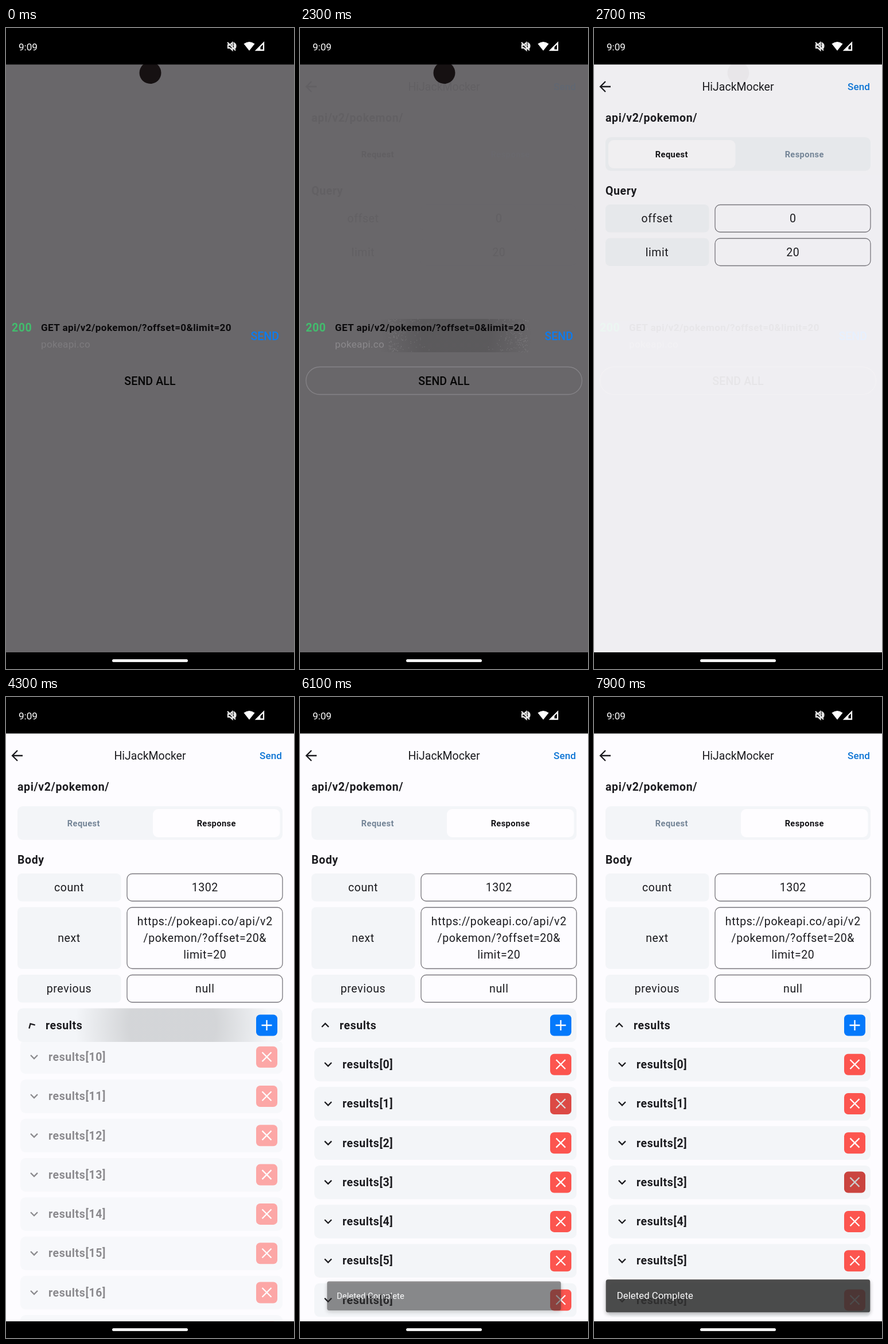
An HTML page that plays this animation: 502x1115 px, repeating every 8000 ms.

```html
<!DOCTYPE html>
<html lang="en">
<head>
<meta charset="utf-8">
<title>Request mocker</title>
<style>
  html, body { margin: 0; width: 100%; height: 100%; overflow: hidden; background: #000; }
  svg { display: block; width: 502px; height: 1115px; font-family: Roboto, sans-serif; }
  text { white-space: pre; }
  .line { fill: none; stroke-width: 2.3; }
  #toastBox { filter: drop-shadow(0 3px 4px rgba(0, 0, 0, .35)); }
</style>
</head>
<body>
<svg id="stage" viewBox="0 0 502 1115">
  <defs>
    <radialGradient id="glow">
      <stop offset=".45" stop-opacity=".13"/>
      <stop offset="1" stop-opacity="0"/>
    </radialGradient>
    <clipPath id="app"><rect y="63" width="502" height="1023"/></clipPath>
    <clipPath id="callRow"><rect y="506" width="502" height="58"/></clipPath>
    <clipPath id="resultRow"><rect x="20" y="541.5" width="462" height="58.5" rx="9"/></clipPath>
    <clipPath id="listArea"><rect y="600" width="502" height="486"/></clipPath>
  </defs>
  <g clip-path="url(#app)">
    <g id="home"></g>
    <g id="paper"></g>
    <g id="ink"></g>
    <g id="response"></g>
    <g id="toast"></g>
  </g>
  <g id="system"></g>
</svg>
<script>
const LOOP = 8000, STEP = 100;
const INK = '#1b1b1f', MUTED = '#738496', BOX = '#f3f5f8', PAPER = '#fdfcff';
const $ = id => document.getElementById(id);

// ---- drawing helpers ----
function add(parent, tag, attrs, content) {
  const el = document.createElementNS('http://www.w3.org/2000/svg', tag);
  for (const k in attrs) el.setAttribute(k, attrs[k]);
  if (content !== undefined) el.textContent = content;
  parent.append(el);
  return el;
}
const group = (parent, attrs = {}) => add(parent, 'g', attrs);
const box = (parent, x, y, w, h, r, fill, more = {}) =>
  add(parent, 'rect', { x, y, width: w, height: h, rx: r, fill, ...more });
const line = (parent, d, color, more = {}) =>
  add(parent, 'path', { d, stroke: color, class: 'line', ...more });

// y is the middle of the capital letters
function label(parent, str, x, y, { size = 19.5, weight = 400, ls = .6, fill = INK, anchor = 'start' } = {}) {
  return add(parent, 'text', {
    x, y: y + size * .356, fill, 'font-size': size, 'font-weight': weight,
    'letter-spacing': ls, 'text-anchor': anchor
  }, str);
}
const keyBox = (parent, y, h) => box(parent, 20, y, 180.5, h, 8, BOX);
const valueBox = (parent, y, h) =>
  box(parent, 211, y + .5, 271, h - 1, 9, 'none', { stroke: '#77757b', 'stroke-width': 1.3 });
function field(fills, lines, y, h, key, values) {
  keyBox(fills, y, h);
  valueBox(lines, y, h);
  label(lines, key, 110, y + h / 2, { anchor: 'middle' });
  values.forEach((v, i) => label(lines, v, 346.8, y + 24.3 + i * 29.2, { anchor: 'middle' }));
}
const chevron = (parent, x, y) =>
  line(group(parent, { transform: `translate(${x} ${y})` }), 'M-6-3L0 3L6-3', INK);

// ---- home screen ----
const home = $('home');
box(home, 0, 63, 502, 1023, 0, '#69676a');
add(home, 'circle', { cx: 251.5, cy: 78, r: 19, fill: '#161112' });
const callGlow = group(home, { 'clip-path': 'url(#callRow)' });
const callWave = add(callGlow, 'circle', { cx: 270, cy: 535, fill: 'url(#glow)' });

let seed = 7;
const rand = () => (seed = seed * 16807 % 2147483647) / 2147483647;
let dust = '';
for (let i = 0; i < 320; i++) {
  const side = i % 2 ? 1 : -1;
  const x = 275 + side * (50 + 72 * Math.sqrt(rand())), y = 506 + 58 * rand();
  dust += `M${x.toFixed(1)} ${y.toFixed(1)}h1v1h-1z`;
}
add(callGlow, 'path', { d: dust, fill: '#fff', opacity: .18 });

label(home, '200', 10, 521, { weight: 700, fill: '#42bd6d' });
label(home, 'GET api/v2/pokemon/?offset=0&limit=20', 61, 521, { size: 17.1, weight: 700, ls: .41, fill: '#0b0a0c' });
const host = label(home, 'pokeapi.co', 61, 550, { size: 17.1, ls: .3, fill: '#8b898c' });
label(home, 'SEND', 426.5, 536, { weight: 500, ls: 0, fill: '#0a7cf2' });
const outline = box(home, 10.5, 589.5, 481, 48, 24, 'none', { stroke: '#858387', 'stroke-width': 1.3 });
label(home, 'SEND ALL', 251, 614, { weight: 500, ls: .12, fill: '#050505', anchor: 'middle' });

// ---- detail screen ----
const paper = $('paper'), ink = $('ink'), response = $('response');
box(paper, 0, 63, 502, 1023, 0, PAPER);
box(paper, 20, 190, 462, 58.5, 9, BOX);
const pill = box(paper, 25, 195, 221.5, 49, 9, '#fefdff');
line(ink, 'M29 102H11.5M20 93L11 102L20 111', INK, { 'stroke-width': 2.4 });
label(ink, 'HiJackMocker', 251, 102, { ls: 0, anchor: 'middle' });
label(ink, 'Send', 442, 102, { size: 17.1, weight: 500, ls: .12, fill: '#0c74d4' });
label(ink, 'api/v2/pokemon/', 20, 156, { weight: 700 });
const tabs = ['Request', 'Response'].map((s, i) => {
  const style = { size: 14.64, weight: 700, ls: .4, anchor: 'middle' }, x = 135.3 + i * 231.4;
  return [label(ink, s, x, 219.5, { ...style, fill: MUTED }), label(ink, s, x, 219.5, { ...style, fill: '#111114' })];
});

const reqFills = group(paper), reqInk = group(ink);
label(reqInk, 'Query', 20, 283, { weight: 700 });
field(reqFills, reqInk, 307, 48.5, 'offset', ['0']);
field(reqFills, reqInk, 365.5, 48.5, 'limit', ['20']);

label(response, 'Body', 20, 283, { weight: 700 });
field(response, response, 307, 48.5, 'count', ['1302']);
field(response, response, 365.5, 107.5, 'next', ['https://pokeapi.co/api/v2', '/pokemon/?offset=20&', 'limit=20']);
field(response, response, 483, 48.5, 'previous', ['null']);

const list = group(group(response, { 'clip-path': 'url(#listArea)' }));
const presses = [];
for (let i = 0; i < 20; i++) {
  const y = 639 + i * 68.3;
  box(list, 25, y - 29, 457, 58.5, 9, BOX);
  chevron(list, 49, y);
  label(list, `results[${i}]`, 74, y, { weight: 700 });
  box(list, 436, y - 18.3, 37, 37, 7, '#fc554f');
  line(list, `M446.5 ${y - 8}l16 16m0-16l-16 16`, '#fff', { 'stroke-width': 2 });
  presses[i] = box(list, 436, y - 18.3, 37, 37, 7, '#000');
}

box(response, 20, 541.5, 462, 58.5, 9, BOX);
const resultWave = add(group(response, { 'clip-path': 'url(#resultRow)' }), 'circle',
  { cx: 290, cy: 571, fill: 'url(#glow)' });
const arrow = chevron(response, 44, 571);
label(response, 'results', 69, 571, { weight: 700 });
box(response, 436, 552.5, 37, 37, 7, '#0479fb');
line(response, 'M445.5 571h18m-9-9v18', '#fff', { 'stroke-width': 2.2 });

// ---- toast ----
const toast = $('toast');
box(toast, 15.5, 1012.5, 471, 58.5, 4, '#323232', { id: 'toastBox' });
label(toast, 'Deleted Complete', 35, 1041.5, { size: 17.1, ls: .05, fill: '#fff' });

// ---- system bars ----
const system = $('system');
box(system, 0, 0, 502, 63.5, 0, '#000');
box(system, 0, 1086, 502, 29, 0, '#000');
box(system, 185, 1098, 132, 5, 2.5, '#f4f4f4');
label(system, '9:09', 22, 32.5, { size: 17.1, ls: 0, fill: '#fff' });
line(system, 'M387 29.5h3l4.5-4v13l-4.5-4h-3zM397 28.5q2.5 3.5 0 7M396.5 25.5q6.5 3.5 2.5 10.5M386 25l14 14',
  '#e8e8e8', { 'stroke-width': 1.4 });
add(system, 'path', { d: 'M414.5 27.5Q424 20.5 433.500 27.5L424 39.5Z', fill: '#fff' });
line(system, 'M449 26V38.500H436.500Z', '#fff', { 'stroke-width': 1.6 });
add(system, 'path', { d: 'M435.500 39L443.500 31V39Z', fill: '#fff' });

// ---- motion ----
const ramp = (t, a, b) => Math.min(1, Math.max(0, (t - a) / (b - a)));
const bump = (t, a, b, c, d) => ramp(t, a, b) * (1 - ramp(t, c, d));
const smooth = p => p * p * (3 - 2 * p);
const set = (el, k, v) => el.setAttribute(k, v);

// cubic-bezier(0, 0, .2, 1)
function decelerate(x) {
  let lo = 0, hi = 1;
  for (let i = 0; i < 20; i++) {
    const s = (lo + hi) / 2;
    if (.6 * (1 - s) * s * s + s * s * s < x) lo = s; else hi = s;
  }
  return 3 * (1 - lo) * lo * lo + lo * lo * lo;
}

function render(t) {
  set(host, 'opacity', .6 + .4 * ramp(t, 0, 800));
  set(outline, 'opacity', ramp(t, 800, 1300));
  set(callWave, 'r', 20 + 115 * ramp(t, 2000, 2300) + 150 * ramp(t, 2300, 2700));
  set(callGlow, 'opacity', bump(t, 1950, 2200, 2400, 2700));

  set(paper, 'opacity', ramp(t, 2300, 2740));
  set(ink, 'opacity', ramp(t, 2276, 2576));

  const tab = smooth(ramp(t, 3150, 3450));
  set(pill, 'x', 25 + 231 * tab);
  tabs.forEach(([off, on], i) => {
    const active = i ? tab : 1 - tab;
    set(on, 'opacity', active);
    set(off, 'opacity', 1 - active);
  });
  const answered = t >= 3300;
  for (const g of [reqFills, reqInk]) set(g, 'visibility', answered ? 'hidden' : 'visible');
  set(response, 'visibility', answered ? 'visible' : 'hidden');

  const open = ramp(t, 4200, 4400);
  set(list, 'transform', `translate(0 ${-1392 * (1 - open)})`);
  set(list, 'opacity', open);
  set(arrow, 'transform', `rotate(${180 * ramp(t, 4200, 4320)})`);
  set(resultWave, 'r', 20 + 150 * ramp(t, 4000, 4300) + 180 * ramp(t, 4300, 4700));
  set(resultWave, 'opacity', bump(t, 3950, 4200, 4400, 4800) * 1.2);

  presses.forEach((p, i) => {
    let dark = 0;
    if (i === 1) dark = .13 * (bump(t, 5750, 5950, 6200, 6500) + bump(t, 6700, 6850, 7000, 7350));
    if (i === 3) dark = .2 * ramp(t, 7500, 7750);
    set(p, 'opacity', dark);
  });

  const age = t < 6067 ? -1 : (t - 6067) % 830;
  const scale = .8 + .2 * decelerate(ramp(age, 0, 300));
  set(toast, 'opacity', .87 * bump(age, 0, 52, 620, 695));
  set(toast, 'transform', `translate(251 1041.5) scale(${scale}) translate(-251 -1041.5)`);
}

const start = performance.now(), LEAD = 18;
function tick() {
  const t = (performance.now() - start + LEAD) % LOOP;
  render(Math.floor(t / STEP) * STEP);
  requestAnimationFrame(tick);
}
tick();
</script>
</body>
</html>
```
